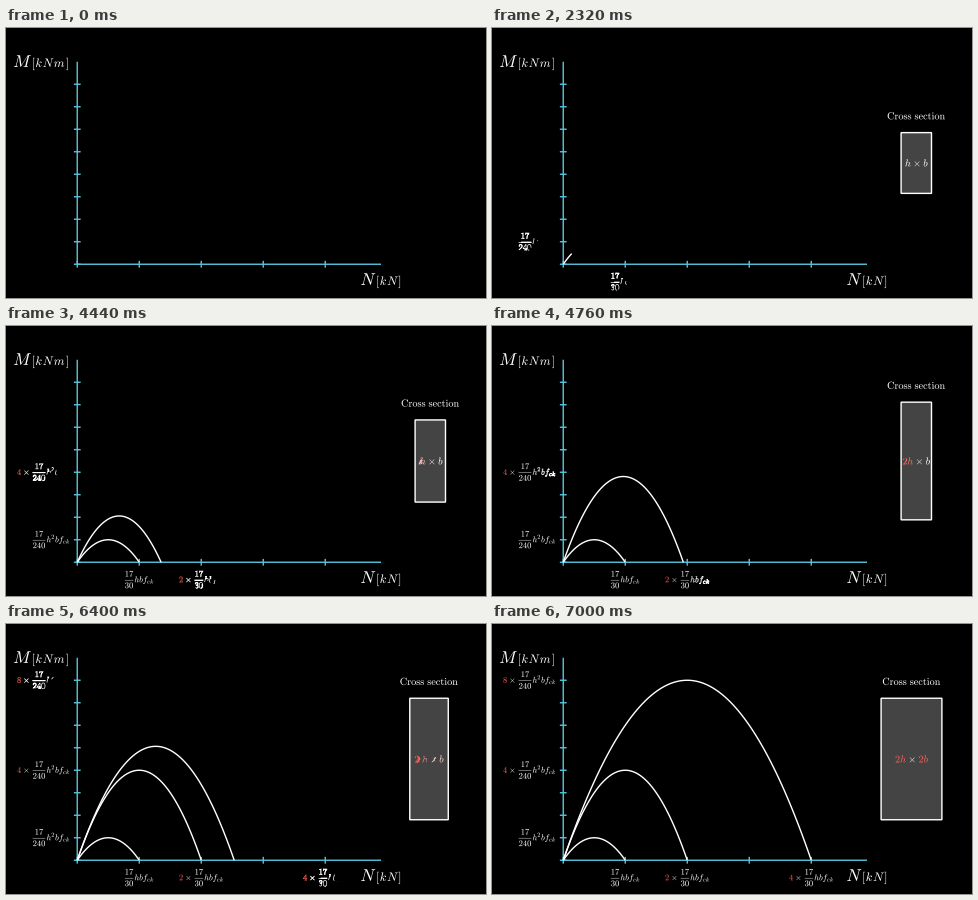
Recreate the animation shown at these times as a matplotlib script. Size 480 by 270 pixels, loop 8000 ms.

```python
import numpy as np
import matplotlib.pyplot as plt
from matplotlib.animation import FuncAnimation
from matplotlib.colors import to_rgb
from matplotlib.patches import PathPatch, Rectangle
from matplotlib.path import Path
from matplotlib.textpath import TextPath

plt.rcParams["mathtext.fontset"] = "cm"

WIDTH, HEIGHT, DPI = 480, 270, 96
PX = 72 / DPI                      # points per pixel
FRAME_MS, LOOP_MS = 40, 8000
WHITE, RED, BLUE, GREY = "#ffffff", "#fc6255", "#58c4dd", "#444444"

ORIGIN_X, ORIGIN_Y = 71.25, 236.25
STEP_X, STEP_Y = 62.0, 22.5
LINE_W, PEN_W = 1.4, 0.7
LABEL_EM, CROSS_EM, TITLE_EM = 8.5, 10.2, 17.0
LAG = 0.085                        # delay between written glyphs
TIMES = r"{\times}"
ADVANCE = {"h": 0.576, "b": 0.429, "f": 0.49, TIMES: 0.778}

fig = plt.figure(figsize=(WIDTH / DPI, HEIGHT / DPI), dpi=DPI, facecolor="black")
ax = fig.add_axes([0, 0, 1, 1])
ax.set_xlim(0, WIDTH)
ax.set_ylim(HEIGHT, 0)
ax.axis("off")


# ---- helpers -------------------------------------------------------------

def smooth(t):
    t = np.clip(t, 0, 1)
    low = 1 / (1 + np.exp(5))
    return np.clip((1 / (1 + np.exp(-10 * (t - 0.5))) - low) / (1 - 2 * low), 0, 1)


def lerp(a, b, s):
    return a + (b - a) * s


def resample(points, count=160):
    length = np.r_[0, np.cumsum(np.hypot(*np.diff(points, axis=0).T))]
    at = np.linspace(0, length[-1], count)
    return np.column_stack([np.interp(at, length, points[:, k]) for k in (0, 1)])


def outline(char):
    """Contours of one math glyph, in em units."""
    polygons = TextPath((0, 0), f"${char}$", size=100).to_polygons()
    contours = [resample(p / 100) for p in polygons if len(p) > 3]
    if char == TIMES:
        xs = np.concatenate(contours)[:, 0]
        shift = ADVANCE[TIMES] / 2 - (xs.min() + xs.max()) / 2
        contours = [c + (shift, 0) for c in contours]
    return contours


def place(char, x, y=0.0, size=1.0):
    return [c * size + (x, y) for c in outline(char)]


def to_pixels(contours, x, baseline, em):
    return [c * (em, -em) + (x, baseline) for c in contours]


def compound(contours):
    return Path.make_compound_path(*[Path(c) for c in contours])


def partial(contours, share):
    """The first share of the outline, contour after contour."""
    left = max(2, int(share * sum(len(c) for c in contours)))
    kept = []
    for contour in contours:
        if left < 2:
            break
        kept.append(contour[:left])
        left -= len(contour)
    return kept


def add_shape(contours, color=WHITE):
    patch = PathPatch(compound(contours), facecolor=color, edgecolor=color,
                      linewidth=0, joinstyle="round", capstyle="butt")
    patch.set_snap(False)
    return ax.add_patch(patch)


def add_line(xs, ys, color):
    return ax.plot(xs, ys, color=color, lw=LINE_W * PX, snap=False,
                   solid_capstyle="butt", solid_joinstyle="round")[0]


# ---- axes ----------------------------------------------------------------

def draw_axes():
    tick = 3.4
    add_line([ORIGIN_X, 375], [ORIGIN_Y] * 2, BLUE)
    add_line([ORIGIN_X] * 2, [ORIGIN_Y, 33.75], BLUE)
    for k in range(5):
        add_line([ORIGIN_X + k * STEP_X] * 2, [ORIGIN_Y - tick, ORIGIN_Y + tick], BLUE)
    for k in range(9):
        add_line([ORIGIN_X - tick, ORIGIN_X + tick], [ORIGIN_Y - k * STEP_Y] * 2, BLUE)


def draw_title(symbol, advance, unit, x, baseline):
    small = 11.9
    widths = {"[": 0.323, "]": 0.323, "k": 0.613, "N": 0.93, "m": 1.014}
    add_shape(to_pixels(outline(symbol), x, baseline, TITLE_EM))
    x += advance * TITLE_EM
    for char in f"[{unit}]":
        add_shape(to_pixels(outline(char), x, baseline, small * 1.03))
        x += widths[char] * small


draw_axes()
draw_title("M", 1.079, "kNm", 7.2, 39)
draw_title("N", 0.912, "kN", 354.4, 257)


# ---- written labels ------------------------------------------------------

def label_glyphs(factor, denominator, squared):
    """Glyphs of factor x 17/denominator h(^2) b f_ck and the total width in em."""
    glyphs, x = [], 0.0
    if factor:
        glyphs += [place(factor, 0), place(TIMES, 0.722)]
        x = 1.842
    bar = 0.5 * len(denominator)
    glyphs += [place(c, x + (bar - 1) / 2 + 0.5 * i, 0.677) for i, c in enumerate("17")]
    corners = [(x, 0.225), (x + bar, 0.225), (x + bar, 0.275), (x, 0.275), (x, 0.225)]
    glyphs.append([resample(np.array(corners))])
    glyphs += [place(c, x + 0.5 * i, -0.686) for i, c in enumerate(denominator)]
    x += bar + 0.12
    for char in "hbf":
        glyphs.append(place(char, x))
        x += ADVANCE[char]
        if char == "h" and squared:
            glyphs.append(place("2", x, 0.413, 0.72))
            x += 0.448
    for char, width in (("c", 0.358), ("k", 0.43)):
        glyphs.append(place(char, x, -0.15, 0.73))
        x += width
    return glyphs, x


written = []   # (patch, contours, color, start, index, count)


def add_label(start, factor, denominator, squared, x, baseline, align):
    glyphs, width = label_glyphs(factor, denominator, squared)
    left = x - align * width * LABEL_EM
    for i, glyph in enumerate(glyphs):
        color = RED if factor and i == 0 else WHITE
        contours = to_pixels(glyph, left, baseline, LABEL_EM)
        written.append((add_shape(contours, color), contours, to_rgb(color),
                        start, i, len(glyphs)))


# start time, moment factor, force factor
STAGES = [(2000, 1, 1), (4000, 4, 2), (6000, 8, 4)]
for start, moment, force in STAGES:
    add_label(start, str(moment) if moment > 1 else "", "240", True,
              63.6, ORIGIN_Y - moment * STEP_Y + 2.55, 1)
    add_label(start, str(force) if force > 1 else "", "30", False,
              ORIGIN_X + force * STEP_X, 256.3, 0.5)


def update_writing(now):
    for patch, contours, rgb, start, index, count in written:
        time = np.clip((now - start) / 1000, 0, 1)
        a = np.clip(time * (1 + LAG * (count - 1)) - LAG * index, 0, 1)
        patch.set_visible(a > 0)
        if a <= 0:
            continue
        drawing = a < 0.5
        patch.set_path(compound(partial(contours, 2 * a) if drawing else contours))
        patch.set_facecolor((*rgb, 0 if drawing else 2 * a - 1))
        patch.set_linewidth(PEN_W * PX * (1 if drawing else 2 - 2 * a))


# ---- curves --------------------------------------------------------------

curves = [add_line([], [], WHITE) for _ in STAGES]


def update_curves(now):
    for k, (curve, (start, moment, force)) in enumerate(zip(curves, STAGES)):
        s = smooth((now - start) / 1000)
        curve.set_visible(s > 0)
        if k == 0:
            u = np.linspace(0, s, 120)
        else:
            u = np.linspace(0, 1, 120)
            moment = lerp(STAGES[k - 1][1], moment, s)
            force = lerp(STAGES[k - 1][2], force, s)
        curve.set_data(ORIGIN_X + u * force * STEP_X,
                       ORIGIN_Y - 4 * u * (1 - u) * moment * STEP_Y)


# ---- cross section -------------------------------------------------------

SIDE_W, SIDE_H, MIDDLE_Y = 30.4, 60.75, 135.0
CENTER_A, CENTER_B = 424.3, 419.5

section = ax.add_patch(Rectangle((0, 0), 1, 1, fc=GREY, ec=WHITE, lw=LINE_W * PX))
section.set_snap(False)
heading_em = outline(r"\mathrm{Cross\ section}")
heading_xs = np.concatenate(heading_em)[:, 0]
heading_mid = (heading_xs.min() + heading_xs.max()) / 2
heading = add_shape(heading_em)


def product(terms, center):
    """Contours and colour of each glyph of a product centred in the section."""
    glyphs, x = [], 0.0
    for char, color in terms:
        if char == TIMES:
            x += 0.222
        glyphs.append((place(char, x), np.array(to_rgb(color))))
        x += ADVANCE.get(char, 0.5) + (0.222 if char == TIMES else 0)
    left = center - x * CROSS_EM / 2
    return [(to_pixels(g, left, MIDDLE_Y + 3.5, CROSS_EM), c) for g, c in glyphs]


products = [
    product([("h", WHITE), (TIMES, WHITE), ("b", WHITE)], CENTER_A),
    product([("2", RED), ("h", RED), (TIMES, WHITE), ("b", WHITE)], CENTER_A),
    product([("2", RED), ("h", RED), (TIMES, WHITE), ("2", RED), ("b", RED)], CENTER_B),
]
product_patches = [add_shape(c) for c, _ in products[-1]]


def morph(source, target, s):
    if s <= 0:
        return source
    blended = []
    for i, (shape, color) in enumerate(target):
        old_shape, old_color = source[i * len(source) // len(target)]
        blended.append(([lerp(a, b, s) for a, b in zip(old_shape, shape)],
                        lerp(old_color, color, s)))
    return blended


def update_section(now):
    # The fade pops in once it is bright enough and settles early.
    fade = 0 if now < 280 else 1 if now >= 800 else smooth(now / 1000)
    taller, wider = smooth((now - 4000) / 1000), smooth((now - 6000) / 1000)
    width, height = SIDE_W * (1 + wider), SIDE_H * (1 + taller)
    center = lerp(CENTER_A, CENTER_B, wider)
    top = MIDDLE_Y - height / 2

    section.set_bounds(center - width / 2, top, width, height)
    section.set_alpha(fade)
    heading.set_path(compound(to_pixels(
        heading_em, center - heading_mid * CROSS_EM, top - 13.3, CROSS_EM)))
    heading.set_alpha(fade)

    if now < 6000:
        glyphs = morph(products[0], products[1], taller)
    else:
        glyphs = morph(products[1], products[2], wider)
    for i, patch in enumerate(product_patches):
        patch.set_visible(i < len(glyphs))
        if i < len(glyphs):
            contours, color = glyphs[i]
            patch.set_path(compound(contours))
            patch.set_facecolor((*color, fade))


def update(frame):
    now = frame * FRAME_MS
    update_section(now)
    update_curves(now)
    update_writing(now)


animation = FuncAnimation(fig, update, frames=LOOP_MS // FRAME_MS,
                          interval=FRAME_MS, repeat=True)
plt.show()
```
